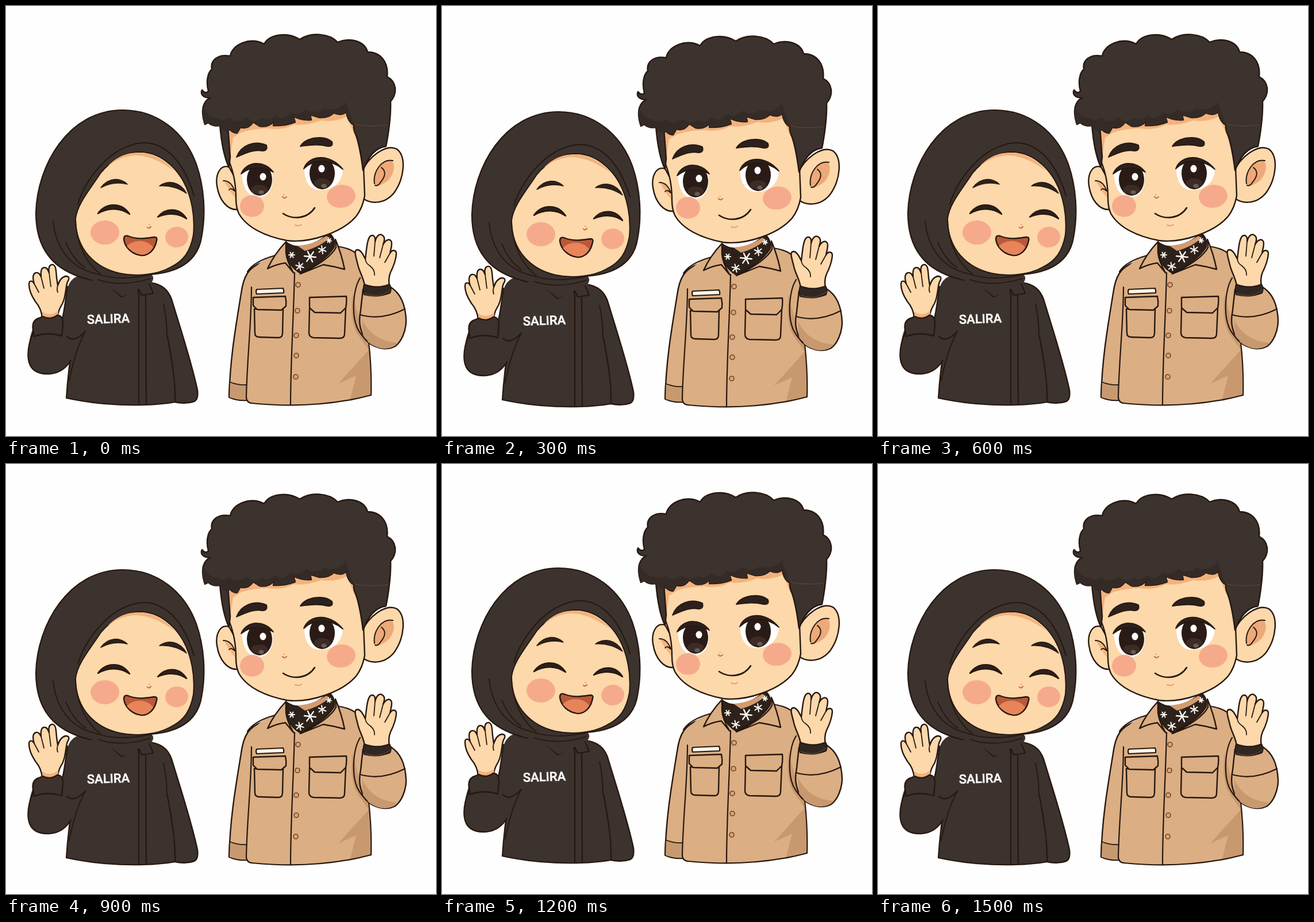
Write an HTML page that moves like this. It is 748 px wide and 748 px high and loops after 1800 ms.

```html
<!DOCTYPE html>
<html lang="en">
<head>
<meta charset="utf-8">
<title>Two friends waving</title>
<style>
  html, body { margin: 0; width: 100%; height: 100%; overflow: hidden; background: #fefefe; }
  svg { display: block; width: 100vw; height: 100vh; }
  path, ellipse, circle { stroke-linecap: round; stroke-linejoin: round; }
  text { font: 500 22px Roboto, Arial, sans-serif; fill: #fff; stroke: #fff; stroke-width: .5; }
</style>
</head>
<body>
<svg viewBox="0 0 748 748"><g id="pair"></g></svg>
<script>
const INK = '#27180f', CLOTH = '#3c322e', SKIN = '#fdd8aa', GLOW = '#f3b27c';
const BLUSH = '#f5ab8b', SHIRT = '#dbae83', SHADE = '#c8996f', DARK = '#2c211d';
const pair = document.getElementById('pair');

function add(tag, attrs, text) {
  const el = document.createElementNS('http://www.w3.org/2000/svg', tag);
  for (const key in attrs) el.setAttribute(key, attrs[key]);
  if (text) el.textContent = text;
  pair.append(el);
}
const shape = (d, fill, width = 2.4, stroke = INK) =>
  add('path', { d, fill, stroke: width ? stroke : 'none', 'stroke-width': width });
const line = (d, width = 2.2, stroke = INK) => shape(d, 'none', width, stroke);
const oval = (cx, cy, rx, ry, fill, turn = 0) =>
  add('ellipse', { cx, cy, rx, ry, fill, transform: `rotate(${turn} ${cx} ${cy})` });

function flake(x, y, r, turn) {
  let d = '';
  for (let i = 0; i < 6; i++) {
    const a = turn + i * Math.PI / 3;
    d += `M${x} ${y}l${r * Math.cos(a)} ${r * Math.sin(a)}`;
  }
  line(d, r > 8 ? 2.4 : 2, '#fff8ee');
}

function girlBody() {
  // right sleeve, torso, raised arm
  shape('M250 481C272 484 282 494 288 510C303 560 323 620 333 668Q335 685 327 688Q312 693 294 689L270 560Z', CLOTH);
  shape('M140 467C119 468 108 478 106 498L104 560L117 578C111 615 107 650 105 682Q170 696 240 694Q272 693 293 689C294 660 289 625 283 590C280 560 282 520 272 492Q262 482 240 479Z', CLOTH, 0);
  line('M105 682C107 650 111 615 117 578M105 682Q170 696 240 694Q272 693 294 689C295 650 288 614 281 575');
  line('M274 518Q280 545 280 575M110 652Q120 600 137 568', 1.8);
  shape('M107 490C104 515 101 532 97 544L48 558C41 574 37 598 39 615C42 635 57 641 77 640C96 638 108 626 115 614L123 565L125 505Z', CLOTH, 0);
  line('M107 488C104 510 101 532 98 544M47 568C40 585 37 602 39 615C42 635 57 641 77 640C96 638 106 628 113 616M106 575Q118 587 138 566');
  shape('M181 486L201 506L229 489L235 504L255 500L247 480Z', CLOTH, 0);
  line('M179 486L201 506L229 488L236 503L256 500Q252 488 246 479');
  line('M231 500L231 693M243 503L244 693M229 490L231 501');
}

function girlHand() {
  shape('M63 543C62 530 58 522 51 514C45 505 40 494 40 484C40 477 46 477 49 483C46 473 46 466 52 464C57 463 59 467 61 471C60 460 62 455 67 455C72 455 73 460 75 464C73 453 77 449 82 450C87 452 87 460 88 472L90 486C93 477 98 471 104 470C110 470 111 474 107 480C103 490 105 504 98 518C92 528 90 534 90 543Z', SKIN);
  shape('M64 543L63 532Q77 541 91 530L90 543Z', GLOW, 0);
  line('M49 483L57 498M61 471L66 491M75 464L78 488M90 486Q88 493 90 498', 1.8);
  shape('M48 568C44 553 48 546 57 543L64 540Q77 547 89 538Q99 538 99 552L97 574Q72 566 48 575Z', CLOTH);
}

function girlHead() {
  const wrap = 'M149 477C101 466 52 440 52 360C54 278 108 181 203 181C264 181 311 220 331 275C345 315 348 362 340 403C334 440 305 463 253 467';
  shape(wrap + 'Q259 472 254 480Q235 491 202 505L178 487Q158 483 149 477Z', CLOTH, 0);
  line(wrap);
  shape('M121 370C124 344 147 318 165 290C185 266 210 254 233 254C267 254 294 279 308 304C323 331 329 366 326 398C321 425 311 442 287 454C262 468 226 471 198 465C157 456 121 425 121 370Z', SKIN, 2);
  shape('M176 279C197 258 214 255 234 255C260 256 281 273 293 287C263 265 240 259 220 260Q194 264 176 279Z', GLOW, 0);
  line('M125 345C138 302 176 252 224 240C266 230 306 259 327 330', 2);
  line('M82 374C87 422 112 455 154 465M121 375C123 416 142 450 164 466M104 411Q116 440 138 456M154 465Q195 480 253 467M160 476Q200 490 251 474', 1.8);
  shape('M165 316C178 298 198 298 211 310C195 306 180 308 165 316Z', DARK, 1.5);
  shape('M267 313C281 302 303 305 314 326C300 316 284 312 267 313Z', DARK, 1.5);
  shape('M160 361C172 342 201 340 215 362C199 351 178 350 160 361Z', DARK, 2.4);
  shape('M264 367C277 351 301 349 314 370C299 360 281 360 264 367Z', DARK, 2.4);
  oval(172, 394, 25, 21, BLUSH);
  oval(297, 402, 20, 18, BLUSH, -8);
  line('M246 385Q249 388 252 384', 2.4, '#c8774b');
  line('M249 380L250 380', 2, '#e79b6b');
  shape('M212 400C229 407 245 404 258 402Q264 402 262 408C259 424 249 434 236 434C219 432 207 420 205 406Q205 398 212 400Z', '#b9593a', 2.4);
  shape('M210 418C224 404 246 407 256 420Q248 433 236 433Q221 431 210 418Z', '#e8845a', 0);
}

function boyBody() {
  // hanging sleeve
  shape('M446 446C422 454 413 470 409 500C400 556 390 610 388 680Q400 687 421 686L430 520Z', SHIRT);
  shape('M389 654Q404 660 419 659L420 686Q402 687 388 681Z', SHADE, 1.8);
  // torso
  shape('M470 432C448 440 432 450 424 474C429 530 421 610 418 680Q418 690 428 691Q540 702 635 677C636 645 634 612 631 585L640 520L620 440L608 431Q598 421 575 418Z', SHIRT, 0);
  shape('M578 657L632 597L635 677Q616 683 598 687L609 643Z', SHADE, 0);
  shape('M603 500C599 535 603 556 611 570L632 600L631 575L613 540Z', SHADE, 0);
  line('M468 434C446 440 429 448 420 462M427 489C427 550 419 620 418 680Q418 690 428 691Q540 702 635 677C636 645 634 612 631 585M576 418Q598 421 610 431');
  line('M502 464C500 550 495 620 495 694');
  // name strip and pockets
  shape('M436 493L482 491Q484 495 483 499L436 501Q434 497 436 493Z', '#fff7e9', 2.2);
  shape('M432 527L433 569Q433 576 441 576L474 577Q481 577 481 569L482 527Z', SHIRT);
  shape('M430 507L486 505Q488 514 487 522L479 529L437 528L430 521Z', SHIRT);
  shape('M528 526L527 568Q527 576 535 577L581 578Q589 578 589 570L591 525Z', SHIRT);
  shape('M528 507L592 505Q593 515 591 525L582 534L537 533L528 525Z', SHIRT);
  for (const [x, y] of [[508, 485], [507, 530], [505, 573], [505, 608], [504, 645]])
    add('circle', { cx: x, cy: y, r: 4, fill: '#d9a477', stroke: '#744426', 'stroke-width': 1.6 });
}

function boyNeck() {
  shape('M488 411Q499 420 517 418Q545 412 562 394Q574 405 571 419C558 441 532 454 512 465Q489 451 487 428Z', '#2d211c', 1.8);
  shape('M507 417Q535 415 557 400L563 403Q548 418 520 426Z', '#d39b70', 0);
  flake(529, 436, 10, .1);
  flake(511, 453, 7, .3);
  flake(550, 424, 7, .4);
  flake(497, 433, 5, 0);
  flake(562, 408, 4, .2);
  shape('M487 410C473 425 463 439 455 457Q470 449 486 447L500 464Q488 443 487 429Z', SHIRT);
  shape('M573 406Q583 429 589 458Q571 453 552 450L512 466C541 452 566 436 574 420Z', SHIRT);
}

function boyArm() {
  shape('M621 493Q619 510 617 529C613 548 615 563 625 580C637 594 660 601 677 592C688 584 696 565 696 547C695 521 687 500 669 489Z', SHIRT);
  shape('M619 545Q637 583 682 586Q671 599 650 595Q629 589 621 573Z', SHADE, 0);
  line('M616 473C604 492 600 538 612 562Q618 573 628 583');
  line('M616 537Q653 548 694 527');
  shape('M624 489C624 476 615 464 612 450C609 437 604 425 611 424C617 424 621 432 625 440C627 425 628 405 634 400C640 397 643 402 642 410C644 400 650 395 655 399C660 402 658 410 656 415C660 407 667 404 670 409C673 414 669 423 668 430C672 423 679 424 679 431C678 445 673 455 669 463C665 472 666 480 667 489Z', SKIN);
  line('M642 410L640 435M656 415L650 438M668 430L659 446M625 440Q626 448 633 452Q642 459 641 468', 1.8);
  shape('M623 484Q646 493 667 484Q672 491 668 499Q647 508 623 502Q620 493 623 484Z', '#302723', 2);
  line('M624 500Q648 510 669 494', 1.5, '#584238');
}

function boyFace() {
  shape('M388 280C372 275 364 294 367 313C371 339 386 355 402 354L407 315Z', SKIN);
  shape('M380 306Q395 304 399 334Q389 322 380 306Z', GLOW, 0);
  line('M378 304Q392 304 398 322M388 320Q391 315 398 322', 1.8);
  shape('M618 290C630 262 661 239 680 249C697 262 693 300 675 325C657 347 630 344 620 333Z', SKIN);
  shape('M642 311C637 290 653 267 669 268C679 273 676 298 658 308C650 313 645 314 642 311Z', '#eda978', 0);
  line('M641 309C638 289 653 265 673 269M653 281Q665 290 652 306Q647 314 642 312', 2);
  shape('M384 205L386 265C393 282 400 302 400 335Q400 350 405 361C419 386 452 401 489 408C530 413 586 393 609 366Q620 352 624 330L622 280L609 180L450 180Z', SKIN);
  shape('M386 210L607 177L614 239Q602 217 594 192Q572 203 548 199Q522 209 501 206Q482 217 456 213Q430 213 409 220L395 229L391 256Z', GLOW, 0);

  shape('M401 263C408 242 432 233 453 242Q456 252 446 252C430 249 417 256 401 263Z', DARK, 1.8);
  shape('M512 244C522 228 553 224 567 236Q570 245 560 244C541 240 526 242 512 244Z', DARK, 1.8);

  eye(441, 302, 'M410 290C411 315 421 334 441 333C459 331 467 313 463 289C446 270 421 273 410 290Z',
    'M409 292C417 270 449 267 465 289C447 279 426 278 409 292Z', 447, 297);
  eye(550, 291, 'M519 281C518 305 529 323 551 320C573 319 585 303 586 284C571 259 534 258 519 281Z',
    'M518 283C526 259 563 255 586 284C564 265 535 266 518 283Z', 549, 283);

  oval(428, 348, 21, 19, BLUSH);
  oval(583, 331, 25, 20, BLUSH, -8);
  line('M481 332Q484 336 488 332', 2.4, '#c67b4d');
  line('M483 328L484 328', 2, '#eda66f');
  line('M482 361C498 372 524 371 537 351', 2.6);
  line('M503 381Q509 384 514 380', 2, '#ef9d74');
}

function eye(x, y, white, lash, hx, hy) {
  shape(white, '#fff', 0);
  oval(x, y, 22, 28, '#2a1b16');
  oval(x, y + 17, 14, 8, '#3d2c25');
  oval(x + 3, y + 22, 4.5, 3.5, '#6d5a50');
  oval(hx, hy, 5.5, 6.5, '#fff');
  shape(lash, DARK, 1.8);
}

function boyHair() {
  const crown = 'M355 160C344 160 337 154 341 146C345 152 350 151 352 148C348 133 350 117 358 110C355 94 369 83 390 87C393 67 424 53 449 66C459 48 490 45 511 58C530 45 562 47 577 63C599 54 624 61 629 80C651 80 666 97 663 123C679 131 682 151 669 166C670 190 665 225 661 244';
  const fringe = 'Q594 201 592 184Q584 192 570 186Q562 195 545 194L529 189L531 198Q516 200 500 192L503 202Q484 209 465 208L467 200Q457 212 441 209L430 202Q421 215 408 211L402 221Q394 221 389 214L385 219Q375 218 372 208Q360 210 352 203L346 206Q340 188 343 175';
  shape(crown + 'C641 247 630 263 621 286C618 262 614 240 609 225Q604 215 605 207' + fringe + 'Q346 164 355 160Z', CLOTH);
  shape('M386 210L390 262L388 281Q376 257 372 206Z', CLOTH);
  // darker fringe and side parting
  shape('M605 207' + fringe + 'Q354 196 366 194Q376 202 389 194Q402 207 418 193Q431 205 446 195Q458 202 468 190Q482 202 496 185Q509 193 522 179Q538 190 553 178Q577 185 591 167Q599 190 605 207Z', '#352b26', 0);
  line('M607 206Q635 211 664 207', 1.5, '#59402f');
  line('M661 244C641 247 630 263 621 286');
}

girlBody();
girlHead();
girlHand();
add('text', { x: 141, y: 553, transform: 'rotate(-1.8 141 553)' }, 'SALIRA');
boyBody();
boyNeck();
boyFace();
boyHair();
boyArm();

// Both friends hop between two heights, holding each for 300 ms.
pair.animate(
  [{ transform: 'translateY(0px)' }, { transform: 'translateY(3px)' }],
  { duration: 600, iterations: Infinity, easing: 'steps(2, jump-none)' }
);
</script>
</body>
</html>
```
